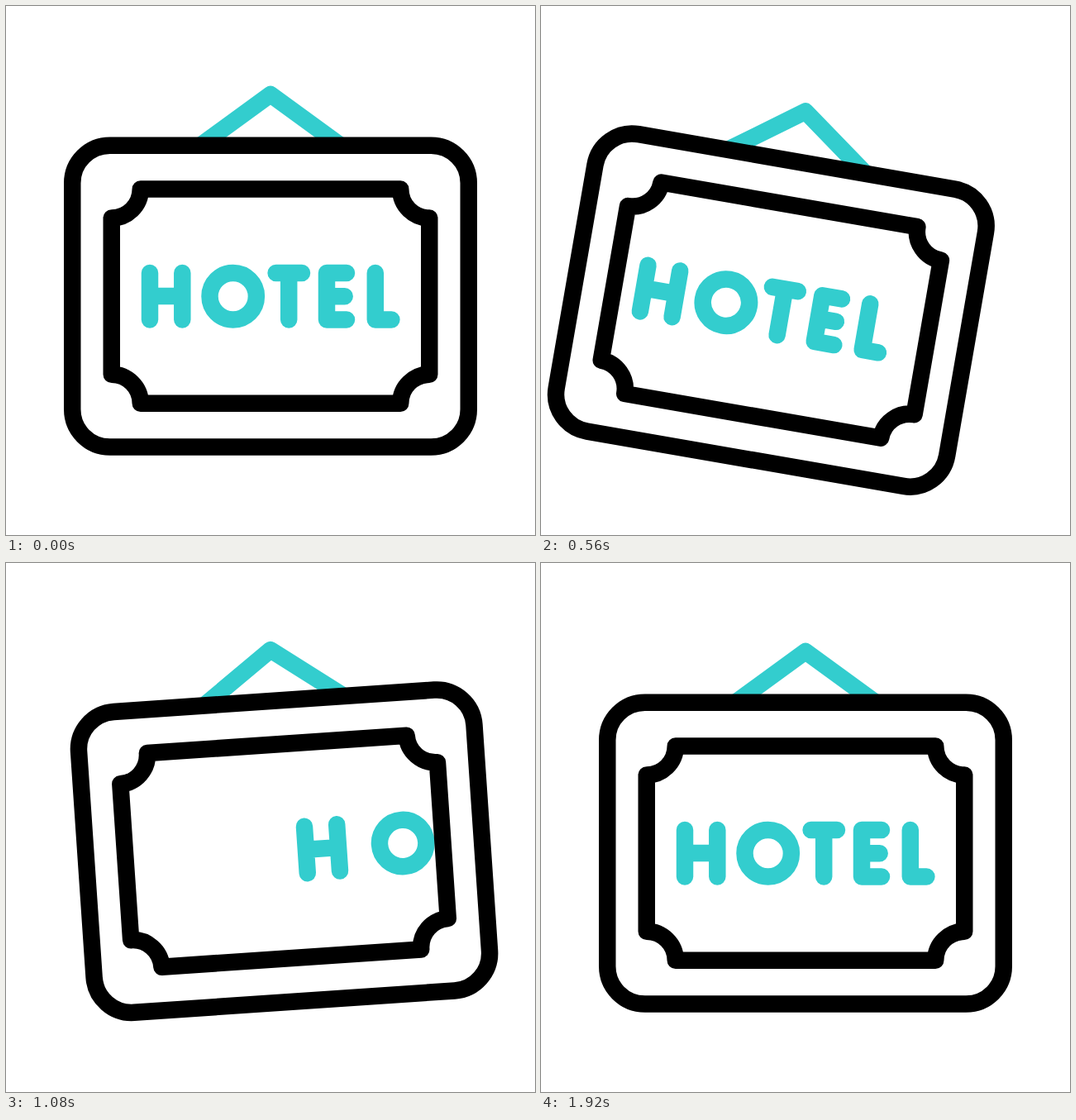
Animation, 640 px wide and 640 px high, one loop 2 s. Source, as an HTML page:

```html
<!DOCTYPE html>
<html lang="en">
<head>
<meta charset="utf-8">
<title>Swinging hotel sign</title>
<style>
  html, body { margin: 0; width: 100%; height: 100%; overflow: hidden; background: #fff; }
  svg { display: block; width: 100%; height: 100%; }
  path, rect, circle { fill: none; stroke-width: 20.5; stroke-linecap: round; stroke-linejoin: round; }
  .teal { stroke: #33cdce; }
  .black { stroke: #000; }
</style>
</head>
<body>
<svg viewBox="0 0 640 640">
  <defs>
    <path id="plaque" d="M162.75 221.5H477.25A35 35 0 0 0 512.25 256.5V445.8A35 35 0 0 0 477.25 480.8H162.75A35 35 0 0 0 127.75 445.8V256.5A35 35 0 0 0 162.75 221.5Z"/>
    <clipPath id="inside"><use href="#plaque"/></clipPath>
  </defs>
  <g id="sign">
    <path class="teal" d="M237 167.5L320 107L403 167.5"/>
    <rect class="black" x="80.25" y="168.75" width="479.5" height="364.75" rx="45.5"/>
    <g id="word" class="teal" clip-path="url(#inside)">
      <path d="M174 323V379.5M213.3 323V379.5M174 351H213.3"/>
      <circle cx="274.7" cy="351.2" r="28.2"/>
      <path d="M326.6 323H358M342.2 323V379.5"/>
      <path d="M412 323H388V379.5H412M388 351.2H409.7"/>
      <path d="M446.8 323V379.5H466.4"/>
    </g>
    <use href="#plaque" class="black"/>
  </g>
</svg>
<script>
const LOOP = 2000, STEP = 40;
const sign = document.getElementById('sign');
const letters = [...document.getElementById('word').children];

// [time, value] keys joined by a smooth ease
const swing = [[120, 0], [640, 10.5], [960, -8], [1280, 5], [1520, 0]];
const bounce = [[120, 0], [520, 22], [840, -12], [1160, 0]];

const smooth = u => {
  u = Math.min(1, Math.max(0, u));
  return u * u * (3 - 2 * u);
};

function ease(keys, t) {
  let value = keys[0][1];
  for (let i = 1; i < keys.length; i++) {
    const [t0, a] = keys[i - 1], [t1, b] = keys[i];
    value += (b - a) * smooth((t - t0) / (t1 - t0));
  }
  return value;
}

// Distance covered when gathering speed from rest over a given lag
const glide = (time, speed, lag) =>
  time <= 0 ? 0 : speed * (time - lag * (1 - Math.exp(-time / lag)));

// Letters draw back, leave to the right, then return from the left, last one first
function slide(i, t) {
  if (t < 1340 - 60 * i)
    return -15 * smooth((t - 280) / 460) + glide(t - 740, 0.7 * (1 + 0.09 * i), 73);
  return -glide(1920 - 80 * i - t, 0.8, 60);
}

function draw(now) {
  const t = Math.floor(now % LOOP / STEP) * STEP;
  sign.setAttribute('transform', `translate(0 ${ease(bounce, t)}) rotate(${ease(swing, t)} 320 107)`);
  letters.forEach((el, i) => el.setAttribute('transform', `translate(${slide(i, t)} 0)`));
}

let start;
function tick(now) {
  start ??= now;
  draw(now - start);
  requestAnimationFrame(tick);
}
draw(0);
requestAnimationFrame(tick);
</script>
</body>
</html>
```
